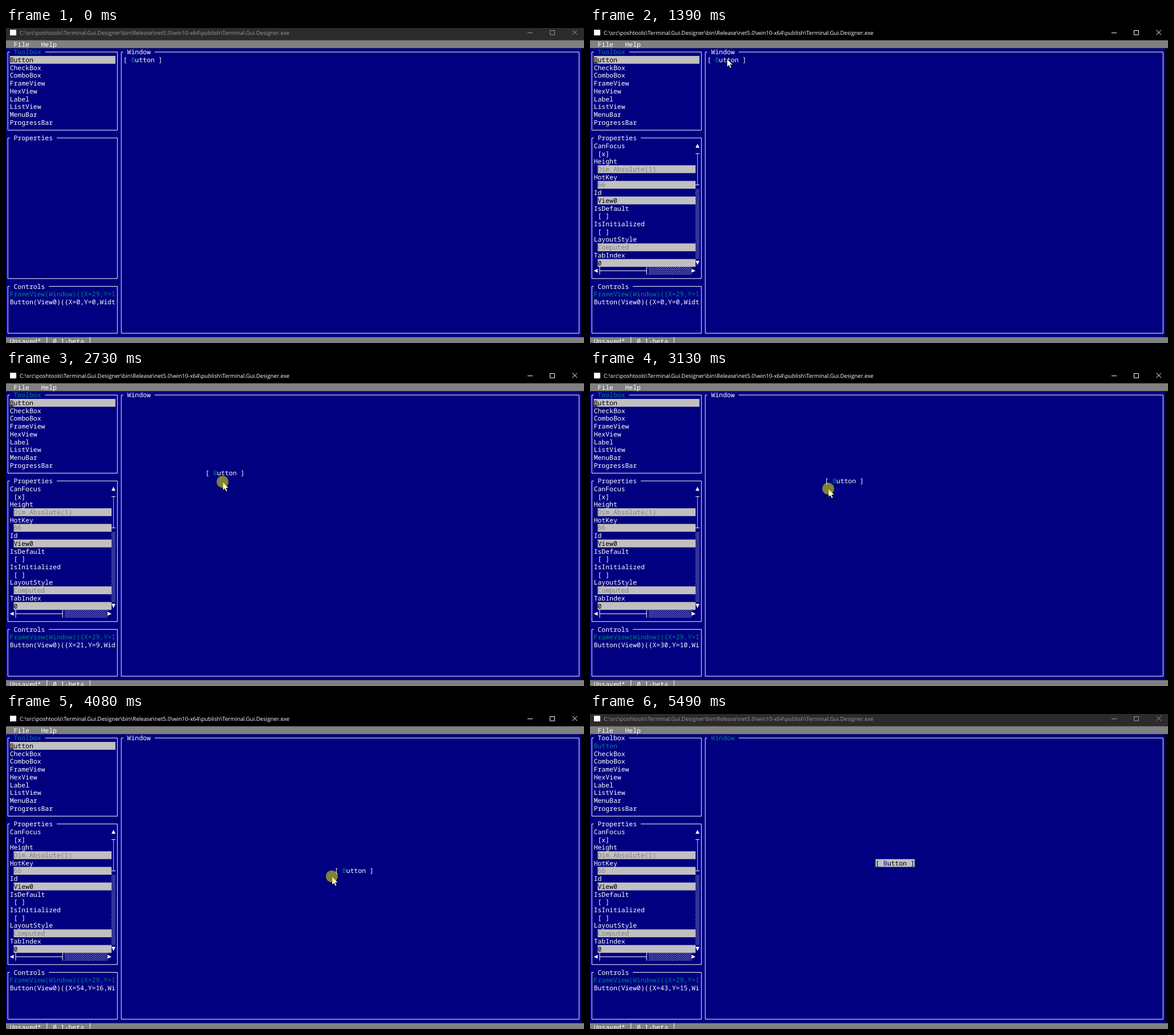
Animation of 1013 by 553 pixels, one loop 5570 ms. Source, as an HTML page:

```html
<!DOCTYPE html>
<html lang="en">
<head>
<meta charset="utf-8">
<title>Terminal designer</title>
<style>
html, body { margin: 0; width: 100%; height: 100%; overflow: hidden; background: #000; }
svg { display: block; width: 1013px; height: 553px; }
text { white-space: pre; text-rendering: geometricPrecision; font: 11.43px "Noto Sans Mono", monospace; }
#caption { font: 9.7px "Open Sans", sans-serif; }
</style>
</head>
<body>
<svg id="stage" viewBox="0 0 1013 553">
  <defs>
    <pattern id="shade" width="3.43" height="3.43" patternUnits="userSpaceOnUse">
      <path d="M0 0h1.1v1.1h-1.1zM1.7 1.7h1.1v1.1h-1.1z" fill="#fff"/>
    </pattern>
  </defs>
</svg>
<script>
const LOOP = 5570, CW = 48 / 7, CH = 96 / 7, X0 = -0.2, Y0 = 21.6;
const NAVY = '#000080', SILVER = '#c0c0c0', GRAY = '#808080', TEAL = '#008080', WHITE = '#fff', BLACK = '#000';
const stage = document.getElementById('stage');
const colX = c => X0 + c * CW, rowY = r => Y0 + r * CH;
const midX = c => colX(c + .5), midY = r => rowY(r + .5);

function add(parent, tag, attrs, content) {
  const el = document.createElementNS(stage.namespaceURI, tag);
  for (const k in attrs) el.setAttribute(k, attrs[k]);
  if (content !== undefined) el.textContent = content;
  return parent.appendChild(el);
}
const rect = (p, x, y, width, height, fill) => add(p, 'rect', { x, y, width, height, fill });
const line = (p, d, stroke = WHITE, width = 1) => add(p, 'path', { d, stroke, fill: 'none', 'stroke-width': width });
const cells = (p, c, r, w, h, fill) => rect(p, colX(c), rowY(r), w * CW, h * CH, fill);
const print = (p, c, r, s, fill = WHITE) => add(p, 'text', { x: colX(c), y: rowY(r) + 10.9, fill }, s);
const show = (el, on) => el.style.display = on ? '' : 'none';

function frame(c, r, c2, r2, title) {
  const l = midX(c), t = midY(r), rt = midX(c2), b = midY(r2);
  line(stage, `M${colX(c + 1)} ${t}H${l}V${b}H${rt}V${t}H${colX(c + title.length + 3)}`);
  return print(stage, c + 2, r, title);
}

// Title bar
const bar = rect(stage, 0, 0, 1013, 22, BLACK);
rect(stage, 7, 3, 11, 10, WHITE);
const caption = add(stage, 'text', { id: 'caption', x: 24, y: 12 },
  'C:\\src\\poshtools\\Terminal.Gui.Designer\\bin\\Release\\net5.0\\win10-x64\\publish\\Terminal.Gui.Designer.exe');
const sysButtons = line(stage, 'M914 8.5h9M953.5 4.5h8v7.5h-8zM992.5 3.5l8.5 8.5m0 -8.5l-8.5 8.5');

// Console
cells(stage, 0, 1, 147, 37, NAVY);
rect(stage, 0, Y0, 1013, CH, GRAY);
rect(stage, 0, rowY(38), 1013, CH, GRAY);
print(stage, 2, 0, 'File');
print(stage, 9, 0, 'Help');
print(stage, 1, 38, 'Unsaved*');
print(stage, 12, 38, '0.1-beta');
for (const c of [10, 21]) line(stage, `M${midX(c)} ${rowY(38)}v${CH}`);

const toolTitle = frame(0, 1, 28, 11, 'Toolbox');
frame(0, 12, 28, 30, 'Properties');
frame(0, 31, 28, 37, 'Controls');
const winTitle = frame(29, 1, 146, 37, 'Window');

const toolBack = cells(stage, 1, 2, 27, 1, SILVER);
const tools = 'Button CheckBox ComboBox FrameView HexView Label ListView MenuBar ProgressBar'
  .split(' ').map((name, i) => print(stage, 1, 2 + i, name));
print(stage, 1, 32, 'FrameView(Window)({X=29,Y=1', TEAL);
const info = print(stage, 1, 33, '');

// Property grid
const props = add(stage, 'g', {});
[['CanFocus', '[x]'], ['Height', 'Dim.Absolute(1)', GRAY], ['HotKey', '66', GRAY], ['Id', 'View0', BLACK],
 ['IsDefault', '[ ]'], ['IsInitialized', '[ ]'], ['LayoutStyle', 'Computed', GRAY], ['TabIndex', '0', BLACK]
].forEach(([name, value, ink], i) => {
  const r = 13 + 2 * i;
  print(props, 1, r, name);
  if (ink) cells(props, 2, r + 1, 25, 1, SILVER);
  print(props, 2, r + 1, value, ink);
});
const arrow = (c, r, d) => add(props, 'path', { d, fill: WHITE, transform: `translate(${midX(c)} ${midY(r)})` });
arrow(27, 13, 'M-3.4 3.6L0 -3.6L3.4 3.6z');
arrow(27, 28, 'M-3.4 -3.6L0 3.6L3.4 -3.6z');
arrow(1, 29, 'M3.4 -3.4L-3.4 0L3.4 3.4z');
arrow(26, 29, 'M-3.4 -3.4L3.4 0L-3.4 3.4z');
cells(props, 27, 19, 1, 9, 'url(#shade)');
cells(props, 15, 29, 11, 1, 'url(#shade)');
line(props, `M${midX(27)} ${midY(14)}V${midY(18)}`, '#ddb5c0');
line(props, `M${colX(27)} ${midY(14)}h${CW}M${colX(27)} ${midY(18)}h${CW}`);
line(props, `M${midX(2)} ${midY(29)}H${midX(14)}M${midX(2)} ${rowY(29)}v${CH}M${midX(14)} ${rowY(29)}v${CH}`);

// The dragged button, the caret and the pointer
const button = add(stage, 'g', {});
const buttonBack = cells(button, 30, 2, 10, 1, SILVER);
const label = print(button, 30, 2, '[  utton ]');
const hotkey = print(button, 32, 2, 'B');
const caret = rect(stage, 0, 0, CW, 2.8, '#3f3f3f');
const pointer = add(stage, 'g', {});
add(pointer, 'path', {
  d: 'M0 0V14.6L3.3 11.5L5.6 16.7L8 15.6L5.8 10.5H10.3Z', fill: WHITE, stroke: BLACK, 'stroke-width': .8
});
const halo = add(pointer, 'circle', { cx: -.5, cy: -.5, r: 10.5, fill: '#ff0', 'fill-opacity': .5 });

// Pointer runs: start, end, dragging, one place per evenly timed step
const runs = [
  [230, 1070, false, [[884, 513], [800, 455], [680, 375], [548, 290], [425, 200], [330, 128], [274, 87], [250, 69],
    [246, 63], [240, 54], [240, 54], [240, 54]]],
  [1620, 1710, false, [[238, 55], [236, 56]]],
  [1860, 1940, false, [[235, 57], [234, 57]]],
  [2090, 3200, true, [[234, 56], [236, 59], [243, 70], [262, 92], [280.5, 112], [291, 145], [309, 178], [330, 186],
    [356, 190], [380, 195], [401, 199], [414, 203], [420, 209], [418, 210], [418, 207], [408, 195]].filter((p, i) => i !== 8)],
  [3300, 3370, true, [[407, 195], [406, 194]]],
  [3530, 4390, true, [[416, 197], [468, 222], [556, 258], [636, 284], [678, 295], [655, 294], [589, 288], [571.5, 285.5],
    [548, 282], [525, 278], [508, 276], [504, 276]]],
  [4620, 5100, false, [[504, 276], [510, 281], [560, 320], [650, 385], [770, 460], [870, 515], [926, 541]]]
];

// While dragging, the button trails the pointer by half a step and settles at the end
const steps = [];
let cell = [0, 0];
for (const [start, end, drag, places] of runs) {
  const last = places.length - 1;
  places.forEach(([x, y], i) => {
    if (drag && i) {
      const [px, py] = i < last ? places[i - 1] : [x, y];
      cell = [Math.floor(((x + px) / 2 - X0) / CW) - 30,
              Math.max(0, Math.floor(((y + py) / 2 - Y0) / CH) - 3)];
    }
    steps.push({ at: start + (end - start) * i / last, x, y, drag, cell });
  });
}

function draw(t) {
  const step = steps.findLast(s => s.at <= t);
  const [bx, by] = step ? step.cell : [0, 0];
  const active = t >= 1070 && t < 5490, dropped = t >= 4620;

  bar.setAttribute('fill', active ? BLACK : '#2b2b2b');
  caption.setAttribute('fill', active ? WHITE : '#999');
  sysButtons.setAttribute('stroke', active ? WHITE : '#999');

  show(props, t >= 1390);
  show(toolBack, !dropped);
  toolTitle.setAttribute('fill', dropped ? WHITE : TEAL);
  winTitle.setAttribute('fill', dropped ? TEAL : WHITE);
  tools[0].setAttribute('fill', dropped ? TEAL : BLACK);

  button.setAttribute('transform', `translate(${bx * CW} ${by * CH})`);
  show(buttonBack, dropped);
  label.setAttribute('fill', dropped ? BLACK : WHITE);
  hotkey.setAttribute('fill', dropped ? '#00f' : TEAL);
  info.textContent = `Button(View0)({X=${bx},Y=${by},Width=10`.slice(0, 27);

  show(caret, t >= 1390 && t < 5250);
  caret.setAttribute('x', colX(dropped ? bx + 32 : 1));
  caret.setAttribute('y', rowY((dropped ? by : 0) + 3) - 2.8);

  show(pointer, step && t < 5180);
  if (step) pointer.setAttribute('transform', `translate(${step.x} ${step.y})`);
  show(halo, step && (step.drag || t >= 1070 && t < 1320));
}

const t0 = performance.now();
function tick() {
  draw((performance.now() - t0) % LOOP);
  requestAnimationFrame(tick);
}
tick();
</script>
</body>
</html>
```
